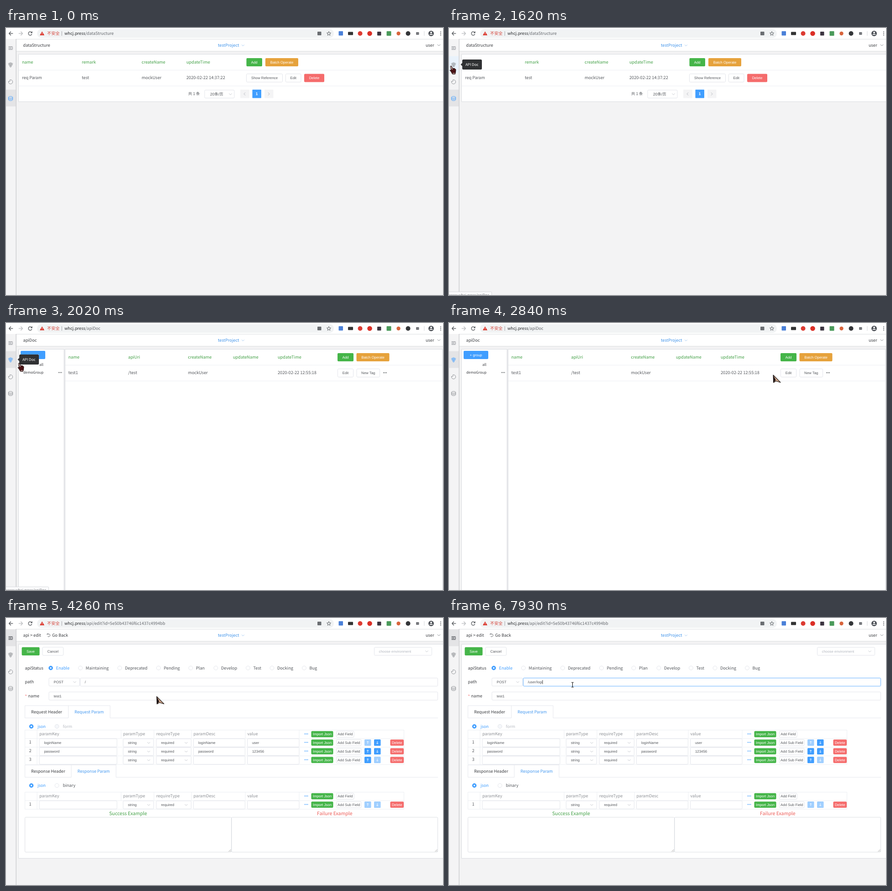
These frames come from a looping animation (957x585 px, 8000 ms). An HTML page with a canvas:

```html
<!DOCTYPE html>
<html lang="en">
<head>
<meta charset="utf-8">
<title>API manager</title>
<style>
html, body { margin: 0; width: 100%; height: 100%; overflow: hidden; background: #fff; }
canvas { display: block; width: 957px; height: 585px; }
</style>
</head>
<body>
<canvas id="stage"></canvas>
<script>
const W = 957, H = 585, LOOP = 8000;
const canvas = document.getElementById('stage');
const c = canvas.getContext('2d');
const dpr = window.devicePixelRatio || 1;
canvas.width = W * dpr;
canvas.height = H * dpr;

const SANS = "'Noto Sans CJK SC', 'Noto Sans CJK JP', 'Noto Sans', sans-serif";
const ARIAL = "'Liberation Sans', Arial, 'Noto Sans CJK SC', sans-serif";
const INK = '#3c3e42', BODY = '#55585d', MUTED = '#8f9297', GREEN = '#43a047', BLUE = '#409eff',
  BTN = '#45b549', AMBER = '#e6a23c', RED = '#f56c6c', EDGE = '#dcdfe6', RULE = '#e8ebf0', PAGE = '#f3f3f4';
const M = 9.18, S = 7.87;

// ---- primitives; text y is the middle of the capitals
function text(s, x, y, color = INK, size = M, font = SANS, align = 'left', weight = '') {
  c.font = `${weight} ${size}px ${font}`;
  c.textAlign = align;
  c.fillStyle = color;
  c.fillText(s, x, y + size * 0.36);
}
const small = (s, x, y, color = BODY, align = 'left') => text(s, x, y, color, S, ARIAL, align);

function rect(x, y, w, h, color) {
  c.fillStyle = color;
  c.fillRect(x, y, w, h);
}
function box(x1, y1, x2, y2, fill, edge, r = 2) {
  c.beginPath();
  c.roundRect(x1, y1, x2 - x1, y2 - y1, r);
  if (fill) { c.fillStyle = fill; c.fill(); }
  if (edge) { c.strokeStyle = edge; c.lineWidth = 0.8; c.stroke(); }
}
function path(points, color, width = 1, fill = null, close = false) {
  c.beginPath();
  points.forEach(([x, y], i) => i ? c.lineTo(x, y) : c.moveTo(x, y));
  if (close) c.closePath();
  if (fill) { c.fillStyle = fill; c.fill(); }
  if (color) { c.strokeStyle = color; c.lineWidth = width; c.stroke(); }
}
const line = (x1, y1, x2, y2, color = RULE, w = 0.8) => path([[x1, y1], [x2, y2]], color, w);
function disc(x, y, r, fill, edge, w = 0.8) {
  c.beginPath();
  c.arc(x, y, r, 0, Math.PI * 2);
  if (fill) { c.fillStyle = fill; c.fill(); }
  if (edge) { c.strokeStyle = edge; c.lineWidth = w; c.stroke(); }
}
function arc(x, y, r, a, b, color, w) {
  c.beginPath();
  c.arc(x, y, r, a, b);
  c.strokeStyle = color;
  c.lineWidth = w;
  c.stroke();
}
const chevron = (x, y, r = 3, color = '#b4b8bf') =>
  path([[x - r, y - r / 2], [x, y + r / 2], [x + r, y - r / 2]], color, 0.8);
function button(label, x1, x2, y, fill, h = 18) {
  box(x1, y - h / 2, x2, y + h / 2, fill || '#fff', fill ? null : EDGE);
  small(label, (x1 + x2) / 2, y, fill ? '#fff' : BODY, 'center');
}
function select(label, x1, x2, y, color = BODY, h = 17.5, pad = 10.5) {
  box(x1, y - h / 2, x2, y + h / 2, '#fff', EDGE);
  small(label, x1 + pad, y, color);
  chevron(x2 - 11, y);
}
function input(label, x1, x2, y, edge = EDGE, h = 18) {
  box(x1, y - h / 2, x2, y + h / 2, '#fff', edge);
  small(label, x1 + 10.5, y);
}
function radio(label, x, y, on, gap = 11.5, off = false) {
  disc(x, y, 4.4, on ? BLUE : off ? '#f5f7fa' : '#fff', on ? BLUE : EDGE);
  if (on) disc(x, y, 1.7, '#fff');
  text(label, x + gap, y, on ? BLUE : off ? '#b9bdc4' : BODY);
}
function dots(x, y, color) {
  for (let i = -1; i < 2; i++) disc(x + i * 3, y, 1, color);
}

// ---- browser frame
function browser(tail) {
  rect(0, 0, W, 24, '#fff');
  box(68, 2.5, 718, 21.5, '#f1f3f4', null, 9.5);
  const arrow = (x, d, color) => {
    line(x - 4.3, 12, x + 4.3, 12, color, 1.3);
    path([[x - d * 0.3, 7.8], [x - d * 4.3, 12], [x - d * 0.3, 16.2]], color, 1.3);
  };
  arrow(11, 1, '#4f5357');
  arrow(32, -1, '#b9bbbe');
  arc(53, 12, 3.9, 0.35, 5.5, '#4f5357', 1.3);
  path([[57.6, 7], [57.6, 11.2], [53.4, 11.2]], null, 0, '#4f5357', true);
  path([[79, 7.5], [84, 16], [74, 16]], null, 0, '#d93025', true);
  rect(78.5, 10.3, 1, 2.9, '#fff');
  rect(78.5, 14, 1, 1, '#fff');
  text('不安全', 90, 12, '#d5473d');
  rect(121.7, 7, 0.9, 10, '#9a9da1');
  text('whcj.press', 128, 12, '#26282b');
  text(tail, 128 + c.measureText('whcj.press').width, 12, '#66696e');
  box(682, 8, 690.5, 16, '#6b6e72', null, 1);
  const star = [];
  for (let i = 0; i < 10; i++) {
    const r = i % 2 ? 2 : 4.7, a = i * Math.PI / 5 - Math.PI / 2;
    star.push([707 + r * Math.cos(a), 12.3 + r * Math.sin(a)]);
  }
  path(star, '#5f6368', 1, null, true);
  box(728.5, 7, 738, 16.5, '#4a80d8', null, 1);
  box(749, 8.5, 760, 15.5, '#333', null, 1);
  disc(775.5, 12, 5, '#dc3b32');
  disc(796.5, 12, 5.3, '#db2f27');
  box(813, 8, 821.5, 16.5, '#3b3440', null, 1);
  box(833.5, 7, 843.5, 17, '#4a9a5a', null, 1);
  disc(859.5, 12, 4.2, '#d8643c');
  disc(880.5, 12, 5, '#333538');
  box(898, 9, 904.5, 15, '#77797d', null, 1);
  rect(915.5, 7, 0.9, 10, '#d0d2d5');
  disc(931, 12, 6, '#50545a');
  disc(931, 10, 1.9, '#fff');
  c.beginPath();
  c.ellipse(931, 15, 3.6, 1.9, 0, Math.PI, 0);
  c.fillStyle = '#fff';
  c.fill();
  for (let i = -1; i < 2; i++) disc(952, 12 + i * 3.5, 1, '#50545a');
}

// ---- application frame
function sidebar(shade, active, hover) {
  rect(0, 24, 21.5, H, '#f4f4f5');
  shade.forEach((a, i) => {
    if (a) rect(0, 25 + i * 36.7, 21.5, 36.7, `rgba(30,35,45,${0.075 * a})`);
  });
  if (hover) rect(0, 61.7, 21.5, 36.7, '#e9f2fb');
  rect(21.5, 24, 1.3, H, '#c9cacd');
  const col = i => i === active ? (i ? BLUE : '#2c2f36') : '#85888d';

  for (let i = 0; i < 3; i++) line(5.5, 41 + i * 3, i === 1 ? 12 : 14.5, 41 + i * 3, col(0), 1.2);
  path([[14.8, 42.2], [12.8, 44], [14.8, 45.8]], null, 0, col(0), true);

  [[-3, -2], [0, -3.2], [3, -2], [-1.7, 0.8], [1.7, 0.8], [0, 3.7]]
    .forEach(([x, y]) => disc(10 + x, 80.5 + y, 1.5, null, col(1), 0.9));

  c.beginPath();
  c.arc(10, 118, 4.6, -1.9, 2.9 + 0.55, false);
  c.quadraticCurveTo(9.5, 119, 8.5, 113.6);
  c.strokeStyle = col(2);
  c.lineWidth = 0.9;
  c.stroke();

  c.strokeStyle = col(3);
  c.lineWidth = 0.9;
  c.beginPath();
  c.ellipse(10, 151.8, 4.6, 2, 0, 0, Math.PI * 2);
  for (const y of [154.6, 157.2]) {
    c.moveTo(14.6, y);
    c.ellipse(10, y, 4.6, 2, 0, 0, Math.PI);
  }
  c.moveTo(5.4, 151.8); c.lineTo(5.4, 157.2);
  c.moveTo(14.6, 151.8); c.lineTo(14.6, 157.2);
  c.stroke();
}
function header(title) {
  rect(22.8, 24, W, H, PAGE);
  rect(22.8, 25, W, 26, '#fff');
  rect(0, 23.8, W, 1, '#d9dbde');
  rect(22.8, 50.5, W, 1, '#dadbde');
  text(title, 37.5, 37.5);
  text('testProject', 464, 37.5, '#3f93ea');
  chevron(519, 38, 2.8, '#8dbdf0');
  text('user', 919, 37.5);
  chevron(948, 37.5, 3.2, '#777a80');
}
function card(x1, y1, x2, y2) {
  rect(x1, y1, x2 - x1, y2 - y1, '#fff');
  c.strokeStyle = '#dadce0';
  c.lineWidth = 1;
  c.strokeRect(x1, y1, x2 - x1, y2 - y1);
}
function cells(list, y, color) {
  list.forEach(([s, x]) => text(s, x, y, color));
}

// ---- pages
function structurePage() {
  header('dataStructure');
  card(27.5, 57.5, 960, 161.5);
  cells([['name', 35], ['remark', 166], ['createName', 297], ['updateTime', 395]], 74.5, GREEN);
  cells([['req Param', 35], ['test', 166], ['mockUser', 297], ['2020-02-22 14:37:22', 395]], 109, BODY);
  line(28, 92.3, W, 92.3);
  line(28, 127, W, 127);
  button('Add', 526.5, 561, 75, BTN);
  button('Batch Operate', 568, 640, 75, AMBER);
  button('Show Reference', 526.5, 605.5, 109.5);
  button('Edit', 612.5, 646, 109.5);
  button('Delete', 653, 697, 109.5, RED);
  text('共 1 条', 399, 144, BODY, 8.53);
  box(435, 136, 500, 153.5, '#fff', EDGE);
  text('20条/页', 447, 144.5, BODY, 8.53, ARIAL);
  chevron(491.5, 145);
  box(513, 135, 533, 153.5, '#f4f4f5', null, 1);
  box(539.5, 135, 559, 153.5, BLUE, null, 1);
  box(566, 135, 585.5, 153.5, '#f4f4f5', null, 1);
  path([[524, 141.5], [521, 144.5], [524, 147.5]], '#a9adb5', 0.9);
  path([[574, 141.5], [577, 144.5], [574, 147.5]], '#a9adb5', 0.9);
  text('1', 549, 144.3, '#fff', 8.53, ARIAL, 'center', 'bold');
}

function docPage() {
  header('apiDoc');
  card(27.5, 57.5, 127, 600);
  card(129.5, 57.5, 956, 600);
  rect(127, 57, 2.5, H, '#e6e7ea');
  button('+ group', 32, 86, 70, BLUE);
  text('all', 73, 91.5, INK, S);
  text('demoGroup', 38, 108.5, INK, S);
  dots(118.5, 108.5, '#55585d');
  cells([['name', 136.5], ['apiUri', 267.5], ['createName', 398.5], ['updateName', 497], ['updateTime', 595]], 74.5, GREEN);
  cells([['test1', 136.5], ['/test', 267.5], ['mockUser', 398.5], ['2020-02-22 12:55:18', 595]], 109, BODY);
  line(130, 92.3, 955.5, 92.3);
  line(130, 127, 955.5, 127);
  button('Add', 726, 761, 75, BTN);
  button('Batch Operate', 767.5, 839.5, 75, AMBER);
  button('Edit', 726.5, 760.5, 109.5);
  button('New Tag', 768, 818.5, 109.5);
  dots(830, 109, '#55585d');
}

function tabs(y, first, second, x1, x2) {
  const b = y + 27, k = '#e2e5eb';
  path([[41.5, b], [41.5, y], [x2, y], [x2, b], [946, b]], k, 0.9);
  path([[41.5, b], [x1, b], [x1, y]], k, 0.9);
  text(first, 55, y + 14);
  text(second, x1 + 13.5, y + 14, '#4599f0');
}

function fieldTable(y, rows) {
  const head = y + 18.5, bottom = head + (rows.length ? rows.length * 19 : 39.5);
  const tools = (label, x2, ty) => {
    dots(657.5, ty - 0.5, BLUE);
    button('Import Json', 668.5, 716.5, ty, BTN, 13.5);
    button(label, 723.5, x2, ty, null, 13.5);
  };
  const move = (x, ty, dir, on) => {
    box(x, ty - 7, x + 14.5, ty + 7, on ? BLUE : '#a0cfff', null, 1.5);
    const m = x + 7.2;
    line(m, ty - 3, m, ty + 3, '#fff', 0.9);
    path([[m - 2, ty + dir], [m, ty + dir * 3], [m + 2, ty + dir]], '#fff', 0.9);
  };
  cells([['paramKey', 73], ['paramType', 256.5], ['requireType', 329], ['paramDesc', 410.5], ['value', 528.5]], y + 8, MUTED);
  tools('Add Field', 762, y + 9);
  path([[41.5, y], [871.5, y], [871.5, bottom], [41.5, bottom]], RULE, 0.8, null, true);
  line(41.5, head, 871.5, head);
  for (const x of [68, 252, 324, 406, 524, 642]) line(x, y, x, rows.length && x === 68 ? bottom : head);
  if (!rows.length) text('暂无数据', 457, head + 20.5, MUTED, M, SANS, 'center');
  rows.forEach(([key, desc, value], i) => {
    const m = head + 9.5 + i * 19;
    if (i) line(41.5, m - 9.5, 871.5, m - 9.5);
    text(String(i + 1), 50.5, m - 1.5, BODY);
    input(key, 73, 243, m);
    select('string', 256.5, 323.5, m);
    select('required', 329, 405.5, m);
    input(desc, 410.5, 523.5, m);
    input(value, 528.5, 642, m);
    tools('Add Sub Field', 778, m - 0.5);
    move(785, m - 0.5, -1, i > 0);
    move(806, m - 0.5, 1, i < rows.length - 1);
    button('Delete', 841.5, 871, m - 0.5, RED, 13.5);
  });
  return bottom;
}

const STATES = [['Enable', 98], ['Maintaining', 163], ['Deprecated', 249], ['Pending', 334], ['Plan', 404.5],
  ['Develop', 459.5], ['Test', 530], ['Docking', 582.5], ['Bug', 653]];
const FIELDS = [['loginName', 'loginName', 'user'], ['password', 'password', '123456'], ['', '', '']];

function editPage(loaded, uri, focus) {
  header('api > edit');
  arc(93.5, 38, 3, -2.2, 2.4, '#55585d', 0.9);
  path([[90, 37], [90.3, 34.2], [93, 35.2]], '#55585d', 0.9);
  text('Go Back', 101, 38);
  const request = loaded ? FIELDS : [], response = loaded ? [['', '', '']] : [];
  const grow = list => 18.5 + (list.length ? list.length * 19 : 39.5);
  const tabY = 245.5 + grow(request) + 1, end = tabY + 59.5 + grow(response);
  card(27.5, 57.5, 960, end + 107.5);

  button('Save', 34.5, 73.5, 73, BTN);
  button('Cancel', 80, 125.5, 73);
  select('choose environment', 806.5, 932.5, 73, '#b4b8c0', 17.5, 10);
  text('apiStatus', 41.5, 109.5);
  STATES.forEach(([s, x], i) => radio(s, x, 109.5, !i));
  text('path', 41.5, 140);
  select('POST', 94, 161.5, 140.3);
  box(162.5, 131.5, 945.5, 149.3, '#fff', focus ? BLUE : EDGE);
  small(uri, 172.5, 140.3);
  if (focus) rect(172.7 + c.measureText(uri).width, 136, 0.8, 9, '#222');
  text('*', 41.5, 171.5, RED);
  text('name', 48.5, 170.5);
  input(loaded ? 'test1' : '', 94, 945.5, 171);

  tabs(192, 'Request Header', 'Request Param', 136.5, 228);
  radio('json', 55.5, 237.5, true, 13.5);
  radio('form', 111.5, 237.5, false, 13, true);
  fieldTable(245.5, request);

  tabs(tabY, 'Response Header', 'Response Param', 143, 241);
  radio('json', 55.5, tabY + 45, true, 13.5);
  radio('binary', 111.5, tabY + 45, false, 13);
  fieldTable(tabY + 59.5, response);

  text('Success Example', 226, end + 9, GREEN, 10.5);
  text('Failure Example', 681, end + 9, '#ec5b56', 10.5);
  for (const [x1, x2] of [[41.5, 493.5], [494, 945.5]]) {
    const b = end + 94;
    box(x1, end + 17.5, x2, b, '#fff', '#d5d8de', 2);
    line(x2 - 6, b - 1, x2 - 1, b - 6, '#888', 0.7);
    line(x2 - 3, b - 1, x2 - 1, b - 3, '#888', 0.7);
  }
}

// ---- overlays
function tooltip(alpha) {
  c.globalAlpha = alpha;
  box(29, 69, 72, 91, '#303133', null, 2.5);
  path([[29.2, 76.5], [25.5, 80], [29.2, 83.5]], null, 0, '#303133', true);
  text('API Doc', 50.3, 80.3, '#fff', 8.1, SANS, 'center', '500');
  c.globalAlpha = 1;
}
function statusBar() {
  box(-4, 578, 93.5, 600, '#fbfbfc', '#cfd1d5', 2);
  text('www.whcj.press/apiDoc', 0, 585.3, '#6a6d72', S);
}
function mask() {
  rect(0, 24.5, W, H, 'rgba(0,5,5,.09)');
  arc(482, 298, 3.6, 0.4, 5.6, 'rgba(255,255,255,.4)', 0.9);
  text('Loading...', 482, 309.5, 'rgba(255,255,255,.5)', M, SANS, 'center');
}

const shift = (pts, x, y) => pts.map(([a, b]) => [a + x, b + y]);
const cursors = {
  arrow(x, y) {
    path(shift([[0, 0], [0.6, 16.5], [6, 13.3], [16, 16.2]], x, y), '#17110f', 1.1, '#cfa58a', true);
    path(shift([[0, 0], [0.6, 16.5], [5.5, 11]], x, y), null, 0, '#1c1213', true);
  },
  hand(x, y) {
    path(shift([[0, 1], [2, 0], [5, 5.5], [9, 5.5], [12, 8], [11.5, 13], [10.5, 18], [4.5, 18], [2, 13.5], [-1, 9.5], [2, 9]], x, y),
      '#1a0a0a', 1, '#4b1215', true);
    path(shift([[1, 1.4], [4.2, 8]], x, y), '#f1e2dc', 1.3);
    path(shift([[5, 16.3], [10, 16.3]], x, y), '#e9d8d0', 1.1);
  },
  beam(x, y) {
    line(x, y - 4.5, x, y + 5, '#111', 1.1);
    line(x - 2.5, y - 5, x + 2.5, y - 5, '#111', 1);
    line(x - 2.5, y + 5.3, x + 2.5, y + 5.3, '#111', 1);
  }
};

const POINTER = [
  [200, 'arrow', 680, 286], [400, 'arrow', 585, 252], [600, 'arrow', 420, 205], [800, 'arrow', 230, 150],
  [1000, 'arrow', 80, 105], [1210, 'arrow', 8, 82], [1410, 'hand', 3, 83], [1820, 'arrow', 6, 85],
  [2020, 'hand', 27, 88], [2230, 'arrow', 190, 108], [2450, 'arrow', 400, 114], [2640, 'arrow', 590, 116],
  [2840, 'arrow', 710, 114], [3040, 'hand', 737, 111], [3250, 'arrow', 738, 113], [3660, 'arrow', 560, 190],
  [3860, 'arrow', 430, 203], [4060, 'arrow', 330, 172], [4270, 'beam', 280, 148], [4480, 'beam', 270.5, 145.3],
  [4880, 'beam', 270.5, 146.2]
];
const TYPED = [[0, '/'], [5900, '/u'], [6100, '/us'], [6300, '/user'], [6900, '/user/'],
  [7520, '/user/l'], [7730, '/user/log'], [7930, '/user/logi']];
const at = (keys, t) => keys.filter(k => k[0] <= t).pop();

function draw(t) {
  c.setTransform(dpr, 0, 0, dpr, 0, 0);
  c.textRendering = 'geometricPrecision';
  c.textBaseline = 'alphabetic';
  c.lineJoin = 'round';
  rect(0, 0, W, H, PAGE);

  if (t < 1820) {
    structurePage();
    sidebar([0, 0, 0, 1], 3, t >= 1410);
    browser('/dataStructure');
  } else if (t < 3250) {
    docPage();
    sidebar([0, t < 2020 ? 0.5 : 1, 0, t < 2020 ? 0.4 : 0], 1, false);
    if (t < 2020) mask();
    browser('/apiDoc');
  } else {
    const k = t < 3460 ? 0 : t < 3660 ? 0.5 : 1;
    editPage(t >= 3660, at(TYPED, t)[1], t >= 4480);
    sidebar([k, 1 - k, 0, 0], 0, false);
    browser('/api/edit?id=5e50b43746f6c1437c4994bb');
  }
  if (t >= 1410 && t < 2230) {
    tooltip(t < 1620 ? 0.6 : 1);
    statusBar();
  }
  const p = at(POINTER, t);
  if (p) cursors[p[1]](p[2], p[3]);
}

function frame() {
  draw(performance.now() % LOOP);
  requestAnimationFrame(frame);
}
frame();
</script>
</body>
</html>
```
